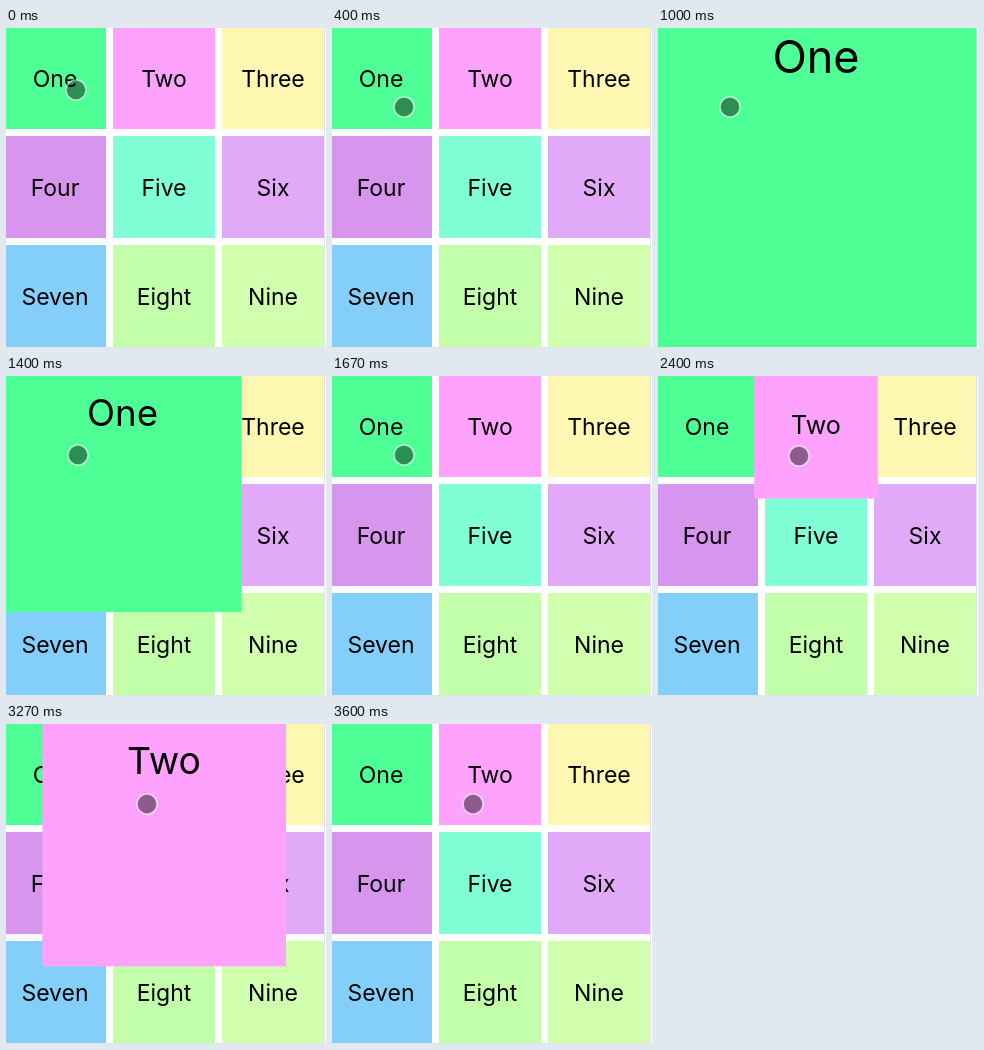
An HTML page that plays this animation: 320x320 px, repeating every 3990 ms.

```html
<!DOCTYPE html>
<html lang="en">
<head>
<meta charset="utf-8">
<title>Expanding cards</title>
<style>
html, body { margin: 0; width: 100%; height: 100%; overflow: hidden; background: #fff; }
svg { display: block; width: 100vw; height: 100vh; }
text { font-family: Inter, Roboto, sans-serif; text-anchor: middle; }
</style>
</head>
<body>
<svg id="stage" viewBox="0 0 320 320"></svg>
<script>
const LOOP = 3990, STEP = 1000 / 15, STIFF = 0.024;
const CARDS = [
  ['One', '#4dff95'], ['Two', '#fea2fd'], ['Three', '#fdf7b2'],
  ['Four', '#d895ee'], ['Five', '#80ffd6'], ['Six', '#e3a9f9'],
  ['Seven', '#84cefa'], ['Eight', '#c3ffab'], ['Nine', '#d0ffae']
];
// opening and closing springs: [start, settled]
const ZOOMS = [
  { card: 0, open: [559, 1000], close: [1345, 1660] },
  { card: 1, open: [2378, 2800], close: [3215, 3600] }
];
// pointer positions: [step, x, y]
const POINTER = [
  [0, 70, 62], [4, 59, 157], [5, 66, 118], [6, 72, 79],
  [26, 82, 79], [27, 110, 79], [28, 138, 79], [29, 141, 80]
];

const stage = document.getElementById('stage');
const lerp = (a, b, p) => a + (b - a) * p;

function add(parent, tag, attrs) {
  const el = document.createElementNS('http://www.w3.org/2000/svg', tag);
  set(el, attrs);
  return parent.appendChild(el);
}

function set(el, attrs) {
  for (const key in attrs) el.setAttribute(key, attrs[key]);
}

function makeCard(index) {
  const [label, fill] = CARDS[index];
  const g = add(stage, 'g', {});
  const card = {
    g, x: index % 3 * 109 - 2, y: Math.floor(index / 3) * 109 - 1,
    rect: add(g, 'rect', { fill }),
    text: add(g, 'text', { 'font-size': 23 })
  };
  card.text.textContent = label;
  placeCard(card, 0);
  return card;
}

function placeCard({ x, y, rect, text }, p) {
  const left = lerp(x, -2, p), top = lerp(y, -1, p);
  set(rect, {
    x: left, y: top,
    width: lerp(x + 102, 318.5, p) - left,
    height: lerp(y + 102, 319, p) - top
  });
  const tx = lerp(x + 51, 158, p), ty = lerp(y + 60, 45, p);
  set(text, { transform: `translate(${tx} ${ty}) scale(${lerp(1, 1.955, p)})` });
}

// critically damped spring from 0 to 1
function spring(t, [start, end]) {
  if (t <= start) return 0;
  if (t >= end) return 1;
  const x = (t - start) * STIFF;
  return 1 - (1 + x) * Math.exp(-x);
}

add(stage, 'rect', { width: 320, height: 320, fill: '#fff' });
add(stage, 'path', { d: 'M318.5 0V319.5H0', fill: 'none', stroke: '#e2e2e2' });
CARDS.forEach((_, i) => makeCard(i));
const zoomed = ZOOMS.map(z => makeCard(z.card));
const pointer = add(stage, 'circle', {
  r: 10, fill: '#000', 'fill-opacity': 0.44,
  stroke: '#fff', 'stroke-opacity': 0.6, 'stroke-width': 1.6
});

function render(ms) {
  const step = Math.floor((ms % LOOP + 4) / STEP), t = step * STEP;
  ZOOMS.forEach((z, i) => {
    const p = spring(t, z.open) - spring(t, z.close);
    zoomed[i].g.style.display = p > 0 ? '' : 'none';
    placeCard(zoomed[i], p);
  });
  const [, cx, cy] = POINTER.filter(p => p[0] <= step).pop();
  set(pointer, { cx, cy });
}

const began = performance.now();
function tick() {
  render(performance.now() - began);
  requestAnimationFrame(tick);
}
tick();
</script>
</body>
</html>
```
